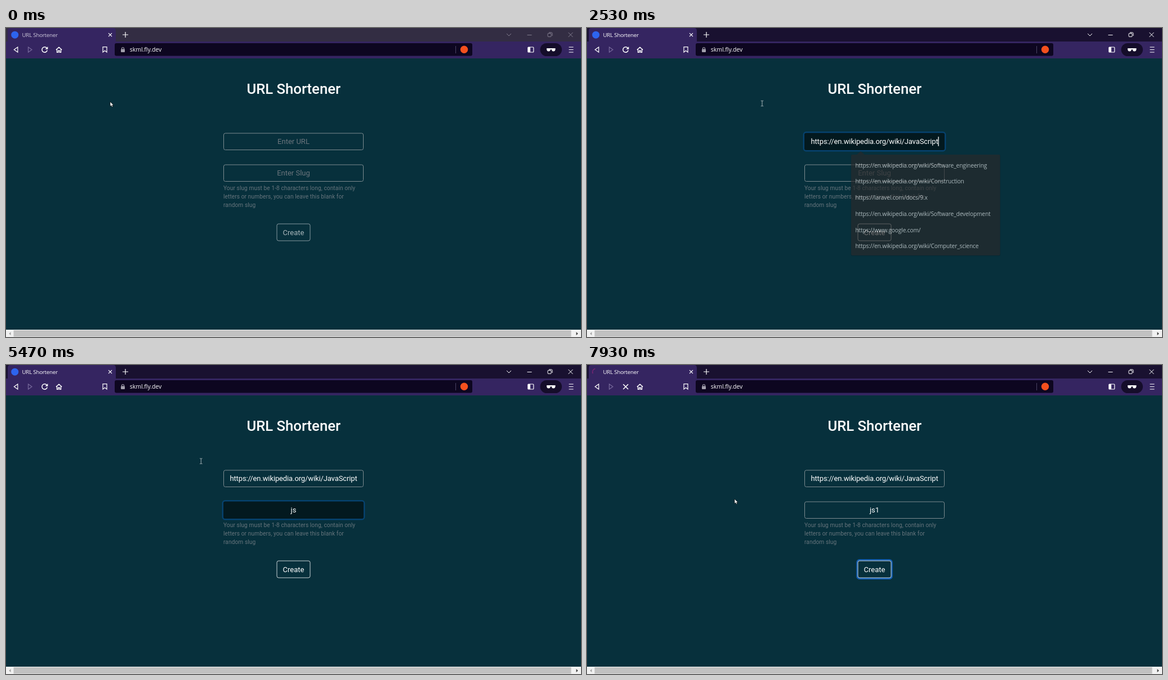
Recreate the animation shown at these times as an HTML page. Size 1021 by 549 pixels, loop 8000 ms.

```html
<!DOCTYPE html>
<html lang="en">
<head>
<meta charset="utf-8">
<title>URL Shortener</title>
<style>
  html, body { margin: 0; width: 100%; height: 100%; overflow: hidden; background: #07303c; }
  svg { display: block; width: 100vw; height: 100vh; }
  .ui { font-family: "Open Sans", "Noto Sans", sans-serif; }
  .page { font-family: Roboto, Inter, sans-serif; font-size: 13px; }
  .mid { text-anchor: middle; }
  .help { font-size: 10.2px; letter-spacing: .07px; fill: #66747c; }
  .list { font-size: 10.2px; letter-spacing: -.16px; fill: #fff; }
  .line { fill: none; stroke: #fff; stroke-width: 1.2; }
</style>
</head>
<body>
<svg viewBox="0 0 1021 549" preserveAspectRatio="none">
  <rect width="1021" height="549" fill="#07303c"/>

  <g class="ui">
    <rect id="bar" width="1021" height="25"/>
    <path d="M3 25V5q0-5 5-5H190q5 0 5 5V25z" fill="#352561"/>
    <rect y="24" width="1021" height="30" fill="#352561"/>
    <circle id="icon" cx="15.7" cy="12.2" r="6.5" fill="#2d64ee"/>
    <path id="spin" d="M10.4 15.2A6 6 0 0 1 14.6 6.5" fill="none" stroke="#7b2673" stroke-width="1.3"/>
    <text id="tab" x="28.5" y="15.7" font-size="9.7" letter-spacing="-.2">URL Shortener</text>
    <path class="line" d="M182 9.2l6 6m0-6l-6 6M207 12h10m-5-5v10"/>
    <g id="win" fill="none" stroke-width="1">
      <path d="M889 10l4 4 4-4M925.500 12.500h8M998.500 8l8 8m0-8l-8 8"/>
      <rect x="962" y="9.500" width="6" height="6" rx="1"/>
      <path d="M964 8h4.500q1.500 0 1.500 1.500V14"/>
    </g>

    <path class="line" d="M20.800 34v9l-6.500-4.500z"/>
    <path class="line" d="M39.500 34v9l6.500-4.500z" style="stroke:#77699b"/>
    <g id="reload">
      <path class="line" d="M72.600 36A4.700 4.700 0 1 0 73.200 39.500" style="stroke-width:1.500"/>
      <path d="M74.300 33v4.800h-4.800z" fill="#fff"/>
    </g>
    <path id="stop" class="line" d="M64.300 34.200l8.800 8.800m0-8.800l-8.800 8.800" style="stroke-width:1.600"/>
    <path class="line" d="M88.800 38.800l5.200-4.600 5.200 4.600M90.500 38v5.200h2.300v-3h2.400v3h2.300V38" style="stroke-width:1.400"/>
    <path class="line" d="M172 33.700h7v9.300l-3.500-2.800-3.500 2.800z"/>
    <rect x="193" y="27" width="635" height="22.500" rx="3" fill="#0d0620"/>
    <rect x="204" y="37.500" width="7" height="5.500" rx="1" fill="#a29fac"/>
    <path class="line" d="M205.500 38v-1.500a2 2 0 0 1 4 0V38" style="stroke:#a29fac"/>
    <text x="219.800" y="42.200" font-size="10.500" letter-spacing="-.05" fill="#fff">skml.fly.dev</text>
    <path d="M798.500 32v13" stroke="#4a4363"/>
    <circle cx="813.500" cy="38.300" r="6.700" fill="#f4501e"/>
    <rect class="line" x="926.800" y="34" width="10" height="9" rx="1"/>
    <rect x="927" y="34" width="4" height="9" fill="#fff"/>
    <rect x="948.500" y="27" width="38.500" height="23" rx="11.500" fill="#150d2a"/>
    <path d="M960 36h15.500v2q-.5 3.500-3.500 3.500-2.800 0-3.500-3.500h-1.500q-.7 3.500-3.500 3.500-3 0-3.500-3.500z" fill="#fff"/>
    <path class="line" d="M999.500 34h8m-8 4.500h8m-8 4.500h8"/>
  </g>

  <g class="page">
    <text class="mid" x="510.700" y="117" font-size="26" font-weight="500" fill="#fff" style="font-size:25.700px">URL Shortener</text>
    <g id="fields"></g>
    <text class="help" x="386" y="287.500">Your slug must be 1-8 characters long, contain only</text>
    <text class="help" x="386" y="302.500">letters or numbers, you can leave this blank for</text>
    <text class="help" x="386" y="317.800">random slug</text>
    <rect id="btnRing" x="479.700" y="346.500" width="61.600" height="33" rx="4" fill="none" stroke="#1560b4" stroke-width="2.800"/>
    <g id="btn">
      <rect id="btnBox" x="481" y="348" width="59" height="30" rx="3" stroke="#c9d2d5" stroke-width="1"/>
      <text id="btnText" class="mid" x="510.500" y="367.700">Create</text>
    </g>
  </g>

  <g id="lists" class="ui"></g>

  <rect y="536" width="1021" height="13" fill="#f1f1f1"/>
  <rect x="13.500" y="537" width="990" height="11.500" fill="#c1c1c1"/>
  <path d="M8.500 540v6l-3.200-3z" fill="#a3a3a3"/>
  <path d="M1012.500 540v6l3.200-3z" fill="#404040"/>

  <g id="cursor">
    <path id="arrow" d="M0 0V8.300L1.900 6.600 3.200 9.300 4.700 8.600 3.500 6H6z" fill="#fff" stroke="#000" stroke-width=".6"/>
    <path id="beam" d="M-2.200-4.700H-.6L0-4.200.6-4.700H2.200M0-4.200V4.200M-2.200 4.700H-.6L0 4.200.6 4.700H2.200" fill="none" stroke="#b9c3c6" stroke-width=".9"/>
    <path id="hand" d="M-1 5V1Q-1 0 0 0T1 1V4L4.500 4.800Q5.300 5 5.200 6L4.500 10H-.8L-3.600 6.500Q-3.500 5-2.300 5.600L-1 6.600z" fill="#fff" stroke="#000" stroke-width=".6"/>
  </g>
</svg>

<script>
const LOOP = 8000, FPS = 15;
const $ = id => document.getElementById(id);
const set = (el, attrs) => { for (const k in attrs) el.setAttribute(k, attrs[k]); };
const show = (el, on) => set(el, { opacity: +on });
const ease = p => p * p * (3 - 2 * p);
const ramp = (t, start, dur = 150) => Math.min(1, Math.max(0, (t - start) / dur));
const within = (v, a, b) => v >= a && v < b;
const mix = (a, b, p) => `rgb(${a.map((v, i) => Math.round(v + (b[i] - v) * p))})`;

function makeField(y, hint) {
  const g = document.createElementNS('http://www.w3.org/2000/svg', 'g');
  g.innerHTML = `
    <rect x="384.900" y="${y - 1.1}" width="251.200" height="32.700" rx="4" fill="none" stroke="#06426f" stroke-width="2.600"/>
    <rect x="386" y="${y}" width="249" height="30.500" rx="3" fill="#03191f"/>
    <rect x="386.500" y="${y + .5}" width="248" height="29.500" rx="3" fill="none" stroke="#7d8b90"/>
    <text class="mid" x="510.500" y="${y + 19.8}"></text>
    <rect y="${y + 6.7}" width="1.300" height="16.700" fill="#fff"/>`;
  $('fields').append(g);
  const [ring, dark, edge, text, caret] = g.children;
  return (value, glow, shade, blink) => {
    show(ring, glow);
    show(dark, shade);
    show(edge, 1 - shade);
    const label = value || hint;
    if (text.textContent !== label) text.textContent = label;
    set(text, { fill: value ? '#fff' : '#6c757d', 'letter-spacing': value.length > 9 ? -.12 : 0 });
    const half = value ? text.getComputedTextLength() / 2 : 0;
    set(caret, { x: 510.3 + half, opacity: +blink });
  };
}

function makeList(x, y, w, items) {
  const g = document.createElementNS('http://www.w3.org/2000/svg', 'g');
  g.innerHTML = `
    <rect x="${x - .6}" y="${y}" width="${w + 1.2}" height="180.300" rx="3" fill="#000" opacity=".2"/>
    <path d="M${x + 10} ${y}l7-6 7 6z" fill="#29292a"/>
    <rect x="${x}" y="${y}" width="${w}" height="179" rx="2" fill="#29292a"/>` +
    items.map((s, i) => `<text class="list" x="${x + 7.5}" y="${y + 22.7 + i * 28.75}">${s}</text>`).join('');
  $('lists').append(g);
  return g;
}

const urlField = makeField(186.5, 'Enter URL');
const slugField = makeField(242.5, 'Enter Slug');
const wiki = 'https://en.wikipedia.org/wiki/';
const urlList = makeList(469, 225, 264.5, [wiki + 'Software_engineering', wiki + 'Construction',
  'https://laravel.com/docs/9.x', wiki + 'Software_development', 'https://www.google.com/', wiki + 'Computer_science']);
const slugList = makeList(465, 279, 48.5, ['swe', 'c', 'se', '__', 'go', 'cs']);

// pointer stops: time, x, y
const path = [
  [0, 185, 131], [130, 179.5, 154], [735, 179.5, 154], [1330, 311, 134],
  [2670, 311, 134], [3270, 346.3, 170.8], [6200, 346.3, 170.8], [6670, 387.3, 220.7],
  [7000, 340, 242], [7330, 340, 242], [7930, 262, 238]
];

function pointer(t) {
  let i = 1;
  while (i < path.length - 1 && t > path[i][0]) i++;
  const [t0, x0, y0] = path[i - 1], [t1, x1, y1] = path[i];
  const p = ease(ramp(t, t0, t1 - t0));
  return [x0 + (x1 - x0) * p, y0 + (y1 - y0) * p];
}

function pointerKind(x, y) {
  const X = x * 1.5, Y = y * 1.5;
  if (within(X, 481, 540) && within(Y, 348, 378)) return 'hand';
  const overField = within(X, 386, 635) && (within(Y, 187, 217) || within(Y, 243, 273));
  return overField ? 'beam' : 'arrow';
}

function draw(t) {
  const active = t >= 1600, loading = t >= 7200;
  set($('bar'), { fill: active ? '#191130' : '#332d43' });
  set($('tab'), { fill: active ? '#fff' : '#d0cbdd' });
  set($('win'), { stroke: active ? '#fff' : '#827d8e' });
  show($('icon'), !loading);
  show($('spin'), loading);
  set($('spin'), { transform: `rotate(${(7933 - t) * .36} 15.700 12.200)` });
  show($('reload'), !loading);
  show($('stop'), loading);

  const url = t >= 2465 ? wiki + 'JavaScript' : '';
  const slug = 'js1'.slice(0, [4400, 4930, 6130].filter(s => t >= s - 4).length);
  const urlCaret = within(t, 1463, 2063) || within(t, 2463, 3000);
  const slugCaret = [[3463, 4063], [4396, 5463], [5996, 6663]].some(([a, b]) => within(t, a, b));
  urlField(url, ramp(t, 1534) - ramp(t, 3440), ramp(t, 1170) - ramp(t, 3440), urlCaret);
  slugField(slug, ramp(t, 3440) - ramp(t, 7100), ramp(t, 3270) - ramp(t, 7100), slugCaret);

  show(urlList, ramp(t, 1560, 100) - ramp(t, 2466, 200));
  show(slugList, ramp(t, 3540, 120) - ramp(t, 4400, 200));

  const hover = ramp(t, 6850) - ramp(t, 7570);
  show($('btnRing'), ramp(t, 7040));
  show($('btn'), url ? 1 : .65);
  set($('btnBox'), { fill: mix([7, 48, 60], [248, 249, 250], hover) });
  set($('btnText'), { fill: mix([255, 255, 255], [33, 37, 41], hover) });

  const [x, y] = pointer(t), kind = pointerKind(x, y);
  set($('cursor'), { transform: `translate(${x} ${y})` });
  for (const id of ['arrow', 'beam', 'hand']) show($(id), id === kind);
}

const begin = performance.now();
function tick() {
  const t = (performance.now() - begin) % LOOP;
  const step = Math.min(LOOP * FPS / 1000 - 1, Math.floor((t + 5) * FPS / 1000));
  draw(step * 1000 / FPS);
  requestAnimationFrame(tick);
}
tick();
</script>
</body>
</html>
```
